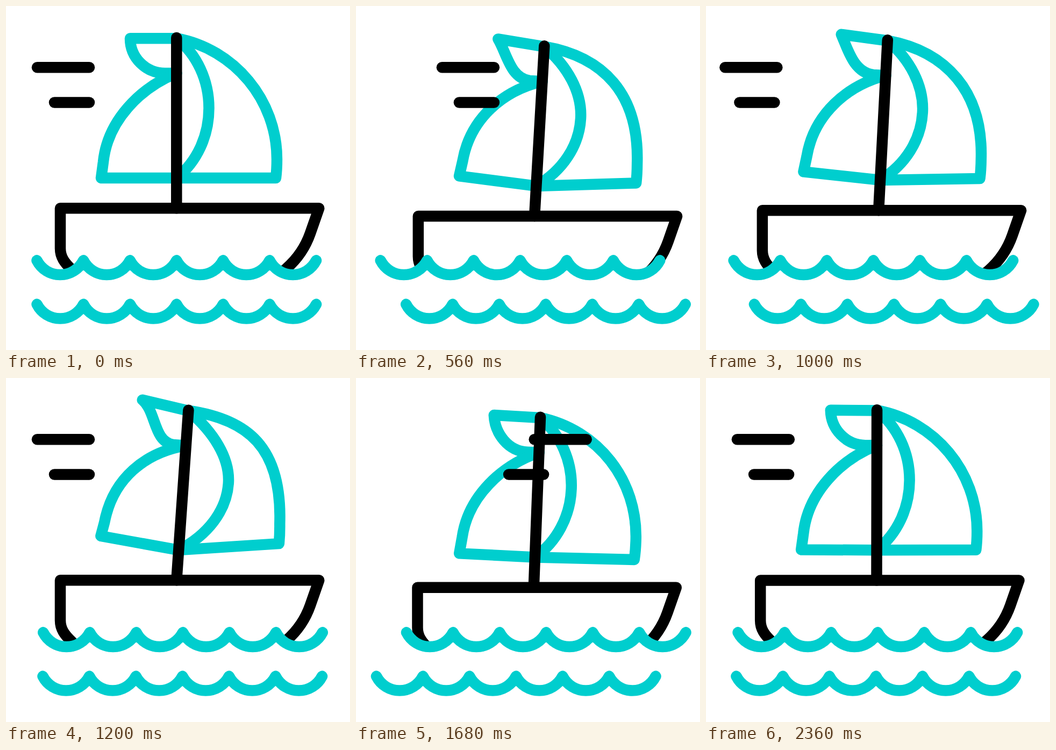
Recreate the animation shown at these times as an HTML page. Size 640 by 640 pixels, loop 2.4 s.

```html
<!DOCTYPE html>
<html lang="en">
<head>
<meta charset="utf-8">
<title>Sailing boat</title>
<style>
  html, body { margin: 0; width: 100%; height: 100%; overflow: hidden; background: #fff; }
  svg { display: block; width: 100vw; height: 100vh; }
  svg * { stroke-linecap: round; stroke-linejoin: round; }
  .teal, .ink { fill: none; stroke-width: 20.5; }
  .teal { stroke: #00cece; }
  .ink { stroke: #000; }
</style>
</head>
<body>
<svg viewBox="0 0 640 640">
  <g id="boat">
    <path class="ink" d="M130 498L122 490C109 478 101 467 101 451V376.3H582.3L566 423C559 443 547 466 522 488L510 498"/>
    <g id="rig">
      <g id="sails"></g>
      <path class="ink" d="M317.3 59V376.3"/>
    </g>
  </g>
  <g id="wave1">
    <path id="water" fill="#fff"/>
    <path class="teal crest"/>
  </g>
  <g id="wave2"><path class="teal crest" transform="translate(0 81.5)"/></g>
  <path id="gust1" class="ink" d="M58 114.3H155"/>
  <path id="gust2" class="ink" d="M90 179.4H155"/>
</svg>
<script>
const LOOP = 2400;
const $ = id => document.getElementById(id);

// Each sail line: relaxed shape, filled shape
const SAILS = [
  ['M317.3 60.2L231 60.2C231 96 260 125 296 125L317.3 125',
   'M317.3 60.2L230.6 46C258 66 256 121 293 125L317.3 125'],
  ['M317.3 125C250 152 189 213 181 290L177 320L317.3 320',
   'M317.3 125C243 143 186 195 176 278L171 304L317.3 320'],
  ['M317.3 60C355 90 377.5 138 377.5 190C377.5 242 355 290 317.3 320',
   'M317.3 60C366 96 401 142 401 190C401 240 370 288 317.3 320'],
  ['M317.3 60C425 80 504 175 504 285C504 297 503.5 308 502 320L317.3 320',
   'M317.3 60C428 68 496 115 501.5 258C502.5 270 503 283 502.7 295L317.3 320']
];

const sails = SAILS.map(([a, b]) => {
  const el = document.createElementNS('http://www.w3.org/2000/svg', 'path');
  el.setAttribute('class', 'teal');
  $('sails').append(el);
  const end = b.match(/[\d.]+/g).map(Number);
  return k => {
    let i = 0;
    el.setAttribute('d', a.replace(/[\d.]+/g, n => (+n + (end[i++] - n) * k).toFixed(2)));
  };
});

const crest = 'M57.5 473.4' + 'a48.5 48.5 0 0 0 86.6 0'.repeat(6);
document.querySelectorAll('.crest').forEach(el => el.setAttribute('d', crest));
$('water').setAttribute('d', crest + 'V531H57.5Z');

function bezier(x1, y1, x2, y2) {
  const at = (a, b, u) => 3 * a * u * (1 - u) ** 2 + 3 * b * u * u * (1 - u) + u ** 3;
  return s => {
    let lo = 0, hi = 1;
    for (let i = 0; i < 24; i++) {
      const u = (lo + hi) / 2;
      if (at(x1, x2, u) < s) lo = u; else hi = u;
    }
    return at(y1, y2, lo);
  };
}
const smooth = s => s * s * (3 - 2 * s);
const easeOut = bezier(.167, .167, .667, 1);
const easeIn = bezier(.333, 0, .833, .833);

// Evenly spaced keys over the loop
function track(keys, eases = []) {
  const n = keys.length - 1;
  return t => {
    const p = t / LOOP * n, i = Math.min(Math.floor(p), n - 1);
    return keys[i] + (keys[i + 1] - keys[i]) * (eases[i] || smooth)(p - i);
  };
}
const bob = track([0, 15, 0, 15, 0]);
const tilt = track([0, 4, 2, 4, 2, 4, 0]);
const fill = track([0, 1, 0, 1, 0, 1, 0]);
const waveEase = [easeOut, smooth, easeIn];
const drift1 = track([0, -14, 37.3, 0], waveEase);
const drift2 = track([0, 42.2, -20, 0], waveEase);

// A gust speeds off to the right, then slows in from the left
const gust = (jump, out, back) => t => t < jump
  ? out.dist * (t / out.at) ** out.pow
  : -back.dist * ((LOOP / 2 - t) / back.at) ** back.pow;
const key = (at, dist, pow) => ({ at, dist, pow });
const pair = (a, b) => t => t < LOOP / 2 ? a(t) : b(t - LOOP / 2);
const blow1 = pair(
  gust(800, key(560, 101, 5), key(200, 23, 3)),
  gust(700, key(480, 272, 3), key(400, 148, 3)));
const blow2 = pair(
  gust(800, key(560, 101, 5), key(200, 28, 2.75)),
  gust(840, key(480, 193, 2.65), key(160, 45, 2.75)));

const move = (id, x, y = 0) => $(id).setAttribute('transform', `translate(${x} ${y})`);

function draw(t) {
  const b = bob(t), k = fill(t);
  move('boat', b, b);
  $('rig').setAttribute('transform', `rotate(${tilt(t)} 317.3 376.3)`);
  sails.forEach(set => set(k));
  move('wave1', drift1(t));
  move('wave2', drift2(t));
  move('gust1', blow1(t));
  move('gust2', blow2(t));
}

const start = performance.now();
function tick() {
  draw((performance.now() - start) % LOOP);
  requestAnimationFrame(tick);
}
tick();
</script>
</body>
</html>
```
